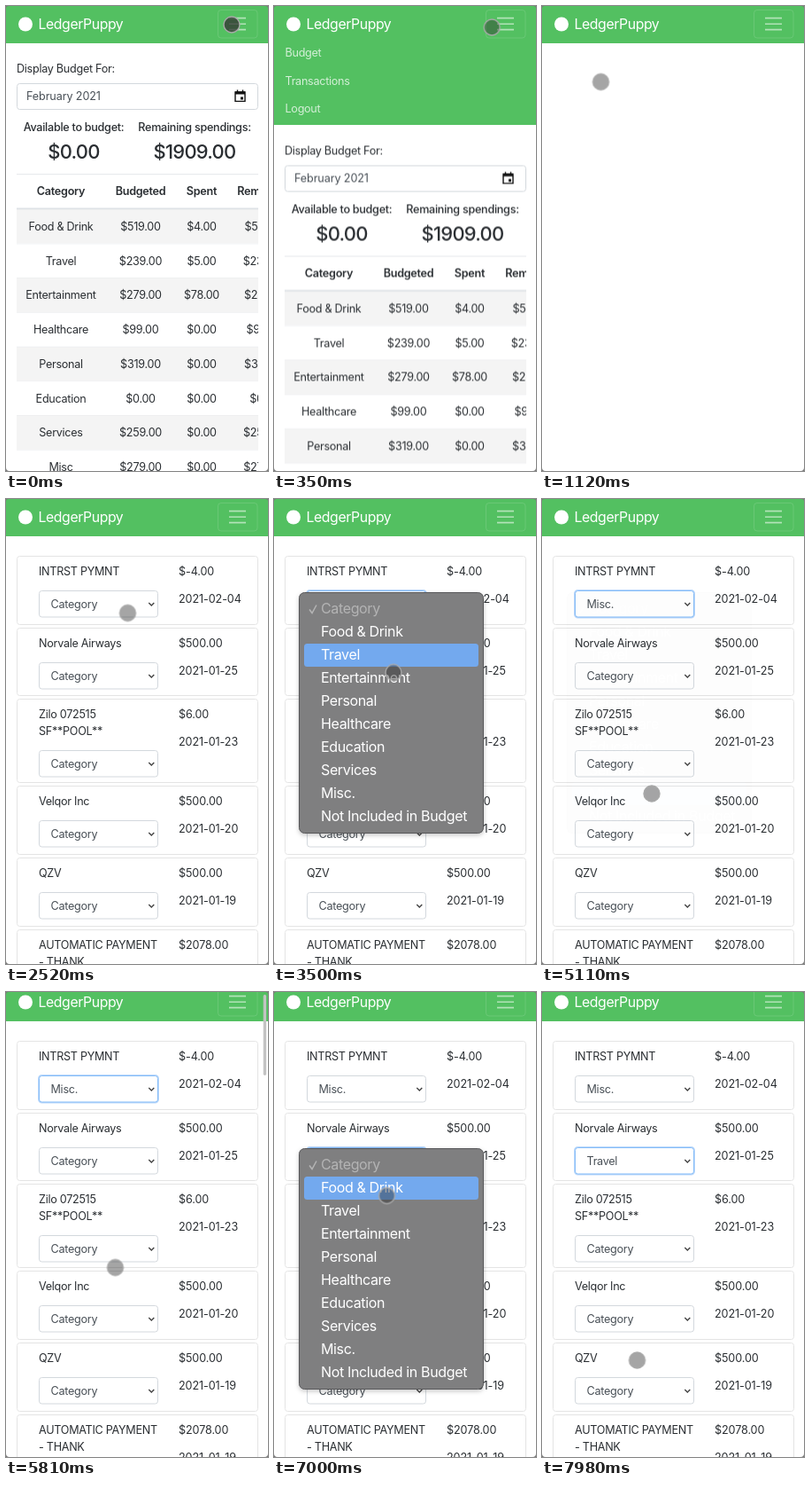
Write an HTML page that moves like this. It is 296 px wide and 524 px high and loops after 8 s.

```html
<!DOCTYPE html>
<html lang="en">
<head>
<meta charset="utf-8">
<title>Budget app demo</title>
<style>
html, body { margin: 0; width: 100%; height: 100%; overflow: hidden; background: #fff; }
svg { display: block; width: 296px; height: 524px; }
text { font: 12.63px Inter, "Liberation Sans", sans-serif; letter-spacing: -.29px; fill: #2a2e32; white-space: pre; }
.mid { text-anchor: middle; }
.medium { font-weight: 500; }
.bold { font-weight: 600; }
.big { font-size: 22px; font-weight: 500; letter-spacing: -.8px; }
.brand { font-size: 15.8px; letter-spacing: -.4px; fill: #fff; }
.link { fill: rgba(255,255,255,.75); }
.field { fill: #495057; }
.date { letter-spacing: -.12px; }
.item { font-size: 16px; letter-spacing: -.36px; fill: #fff; }
.off { fill: #b4b4b4; }
.box { fill: #fff; stroke: #d3d8dd; }
.card { fill: #fff; stroke: #e4e4e4; }
.glow { fill: none; stroke: #bcd9fb; stroke-width: 3; }
.ring { fill: #fff; stroke: #85bcf8; }
.arrow { fill: none; stroke: #444; stroke-width: 1.4; }

/* One loop is 8 s, so 1% is 80 ms. */
.anim { animation: 8s infinite; }
.step { animation-timing-function: step-end; }
#app { animation-name: scroll; }
#budget { animation-name: menu; animation-timing-function: ease; }
#menu { animation-name: first; }
#cards { animation-name: cards; }
#focus0 { animation-name: focus0; }
#focus1 { animation-name: focus1; }
#old0 { animation-name: old0; }
#new0 { animation-name: new0; }
#old1 { animation-name: old1; }
#new1 { animation-name: new1; }
#popup { animation-name: popup; }
#place { animation-name: place; }
#hover { animation-name: hover; }
#bar { animation-name: bar; }
#cursor { animation-name: move; animation-timing-function: ease-in-out; }
#dot { animation-name: press; fill: rgba(40,40,40,.42); stroke: #a8a8a8; stroke-width: 1.4; }

@keyframes scroll {
  0%, 66% { transform: none; }
  70.8%, 100% { transform: translateY(-9px); }
}
@keyframes menu {
  0%, .9% { transform: none; opacity: 1; }
  5.3%, 13% { transform: translateY(95px); opacity: 1; }
  13.01%, 100% { transform: translateY(95px); opacity: 0; }
}
@keyframes first { 0% { opacity: 1; } 13%, 100% { opacity: 0; } }
@keyframes cards { 0% { opacity: 0; } 25.3%, 100% { opacity: 1; } }
@keyframes focus0 { 0% { opacity: 0; } 32.6% { opacity: 1; } 81.2%, 100% { opacity: 0; } }
@keyframes focus1 { 0% { opacity: 0; } 81.2%, 100% { opacity: 1; } }
@keyframes old0 { 0% { opacity: 1; } 62.3%, 100% { opacity: 0; } }
@keyframes new0 { 0% { opacity: 0; } 62.3%, 100% { opacity: 1; } }
@keyframes old1 { 0% { opacity: 1; } 94.8%, 100% { opacity: 0; } }
@keyframes new1 { 0% { opacity: 0; } 94.8%, 100% { opacity: 1; } }
@keyframes popup {
  0%, 33.2% { opacity: 0; }
  33.21%, 62.3% { opacity: 1; }
  64.2%, 82% { opacity: 0; }
  82.01%, 94.8% { opacity: 1; }
  96.6%, 100% { opacity: 0; }
}
@keyframes place { 0% { transform: none; } 72%, 100% { transform: translateY(71px); } }
@keyframes hover {
  0% { opacity: 0; transform: none; }
  36.2% { opacity: 1; transform: none; }
  37.5% { opacity: 1; transform: translateY(26px); }
  45% { opacity: 1; transform: translateY(52px); }
  47% { opacity: 1; transform: translateY(78px); }
  48.9% { opacity: 1; transform: translateY(104px); }
  50.5% { opacity: 1; transform: translateY(130px); }
  52.5% { opacity: 1; transform: translateY(156px); }
  56% { opacity: 1; transform: translateY(182px); }
  72% { opacity: 0; transform: none; }
  85.6% { opacity: 1; transform: none; }
  89.3%, 100% { opacity: 1; transform: translateY(26px); }
}
@keyframes bar {
  0%, 65.9% { opacity: 0; }
  66.2%, 74.3% { opacity: 1; }
  78%, 100% { opacity: 0; }
}
@keyframes move {
  0%, 3.2% { transform: translate(255px, 21px); }
  11%, 15.5% { transform: translate(66.5px, 85.5px); }
  21.9%, 28.6% { transform: translate(130px, 180px); }
  31.3%, 34.6% { transform: translate(137.5px, 128.5px); }
  38.5%, 42% { transform: translate(135px, 190px); }
  54.25% { transform: translate(133.5px, 320.5px); }
  59%, 65.4% { transform: translate(124px, 332px); }
  70.8%, 74% { transform: translate(123.5px, 310.5px); }
  80.6%, 84% { transform: translate(125px, 196px); }
  87.5% { transform: translate(127.5px, 229.5px); }
  91%, 95% { transform: translate(126px, 251px); }
  99.3%, 100% { transform: translate(107.5px, 415px); }
}
@keyframes press {
  0% { fill: rgba(50,50,50,.75); }
  1.7% { fill: rgba(40,40,40,.42); }
  11.6% { fill: rgba(50,50,50,.75); }
  12.9% { fill: rgba(40,40,40,.42); }
  32.2% { fill: rgba(50,50,50,.75); }
  33.4% { fill: rgba(40,40,40,.42); }
  60.8% { fill: rgba(50,50,50,.75); }
  62% { fill: rgba(40,40,40,.42); }
  80.8% { fill: rgba(50,50,50,.75); }
  82% { fill: rgba(40,40,40,.42); }
  93.4% { fill: rgba(50,50,50,.75); }
  94.6%, 100% { fill: rgba(40,40,40,.42); }
}
</style>
</head>
<body>
<svg viewBox="0 0 296 524">
  <defs>
    <clipPath id="table"><rect x="12" y="180" width="273" height="400"/></clipPath>
    <filter id="shade" x="-10%" y="-10%" width="120%" height="120%">
      <feDropShadow dx="0" dy="2" stdDeviation="2.5" flood-opacity=".22"/>
    </filter>
  </defs>
  <rect width="296" height="524" fill="#fff"/>

  <g id="app" class="anim">
    <g id="menu" class="anim step"></g>
    <g id="budget" class="anim"></g>
    <g id="cards" class="anim step"></g>
    <g>
      <rect width="296" height="42" fill="#53c061"/>
      <circle cx="22" cy="20.5" r="8" fill="#fff"/>
      <text class="brand" x="36.5" y="25.7">LedgerPuppy</text>
      <rect x="239.5" y="4.5" width="44.5" height="31.5" rx="3.5" fill="none" stroke="#fff" stroke-opacity=".13"/>
      <path d="M252 13.6h19M252 20.2h19M252 26.6h19" stroke="#fff" stroke-opacity=".55" stroke-width="1.6"/>
    </g>
  </g>

  <g id="place" class="anim step"><g id="popup" class="anim">
    <rect x="28.5" y="105.5" width="208" height="271" rx="6" fill="#7f7f80" stroke="#58585a" filter="url(#shade)"/>
    <rect id="hover" class="anim step" x="34" y="137" width="197" height="26" rx="3.5" fill="#73a9ee"/>
    <path d="M40 124.5l3 4 5-9" fill="none" stroke="#b4b4b4" stroke-width="1.5"/>
    <g id="items"></g>
  </g></g>

  <rect id="bar" class="anim" x="290.7" y="3" width="3.4" height="91" rx="1.7" fill="#c3c3c3"/>
  <g id="cursor" class="anim"><circle id="dot" class="anim step" r="9"/></g>
  <path d="M0 520v4h4q-4 0-4-4M296 520v4h-4q4 0 4-4M0 3v-3h3q-3 0-3 3M296 3v-3h-3q3 0 3 3" fill="#777"/>
</svg>

<script>
const byId = id => document.getElementById(id);
const text = (x, y, s, cls = '', id = '') =>
  `<text x="${x}" y="${y}" class="${cls}"${id && ` id="${id}"`}>${s.replace('&', '&amp;')}</text>`;
const rect = (x, y, w, h, attrs) => `<rect x="${x}" y="${y}" width="${w}" height="${h}" ${attrs}/>`;
const money = n => '$' + n.toFixed(2);

byId('menu').innerHTML = rect(0, 0, 296, 138, 'fill="#53c061"') +
  ['Budget', 'Transactions', 'Logout'].map((s, i) => text(12.5, 57 + 31.6 * i, s, 'link')).join('');

// Budget page: name, budgeted, spent
const rows = [
  ['Food & Drink', 519, 4], ['Travel', 239, 5], ['Entertainment', 279, 78], ['Healthcare', 99, 0],
  ['Personal', 319, 0], ['Education', 0, 0], ['Services', 259, 0], ['Misc', 279, 0]
];
const columns = [62, 152, 221, 292];
const tableLine = (cells, y, cls) => cells.map((s, i) => text(columns[i], y, s, 'mid ' + cls)).join('');
const tableRow = ([name, plan, spent], i) => {
  const y = 229 + 38.7 * i;
  return rect(12, y, 273, 38.7, `fill="${i % 2 ? '#fff' : '#f4f4f4'}"`) +
    rect(12, y, 273, .6, 'fill="#e9ebed"') +
    tableLine([name, money(plan), money(spent), money(plan - spent)], y + 24, '');
};

byId('budget').innerHTML = rect(0, 42, 296, 530, 'fill="#fff"') +
  text(12, 75, 'Display Budget For:') +
  rect(12.5, 87.5, 272, 29, 'rx="3" class="box"') +
  text(23, 106.3, 'February 2021', 'field date') +
  '<path d="M259 97h11v10.4h-11zM261.5 94.5v3M267.5 94.5v3" fill="none" stroke="#111" stroke-width="1.4"/>' +
  '<path d="M259 96.5h11v3h-11zM265 102.5h3v3h-3z" fill="#111"/>' +
  text(76.5, 141, 'Available to budget:', 'mid medium') + text(76.5, 172, '$0.00', 'mid big') +
  text(213, 141, 'Remaining spendings:', 'mid medium') + text(213, 172, '$1909.00', 'mid big') +
  '<g clip-path="url(#table)">' +
  rect(12, 189.3, 273, .8, 'fill="#dee2e6"') +
  tableLine(['Category', 'Budgeted', 'Spent', 'Remaining'], 213.3, 'bold') +
  rect(12, 227.5, 273, 1.5, 'fill="#dee2e6"') +
  rows.map(tableRow).join('') + '</g>';

// Transactions: top, height, price, date, description lines
const cards = [
  [64.5, 77, '$-4.00', '2021-02-04', 'INTRST PYMNT'],
  [145.5, 76, '$500.00', '2021-01-25', 'Norvale Airways'],
  [225.5, 94, '$6.00', '2021-01-23', 'Zilo 072515', 'SF**POOL**'],
  [323.5, 77, '$500.00', '2021-01-20', 'Velqor Inc'],
  [404.5, 77, '$500.00', '2021-01-19', 'QZV'],
  [485.5, 115, '$2078.00', '2021-01-19', 'AUTOMATIC PAYMENT', '- THANK']
];
const picks = ['Misc.', 'Travel'];

function select(y, i) {
  const frame = cls => rect(37.5, y, 134, 29.5, `rx="3" class="${cls}"`);
  const label = (s, id, cls = 'field') => text(50.5, y + 19.6, s, cls, id);
  const values = picks[i]
    ? `<g id="focus${i}" class="anim step">${frame('glow')}${frame('ring')}</g>` +
      label('Category', 'old' + i, 'field anim step') + label(picks[i], 'new' + i, 'field anim step')
    : label('Category');
  return frame('box') + values + `<path class="arrow" d="M161.3 ${y + 13.6}l3 3 3-3"/>`;
}

byId('cards').innerHTML = cards.map(([y, h, price, date, ...lines], i) =>
  rect(12.5, y, 272, h, 'rx="3" class="card"') +
  lines.map((s, n) => text(37, y + 21.3 + 19 * n, s)).join('') +
  text(195, y + 21.3, price, 'date') + text(195, y + 52.4, date, 'date') +
  (i < 5 ? select(y + 39 + 19 * (lines.length - 1), i) : '')
).join('');

byId('items').innerHTML = ['Category', 'Food & Drink', 'Travel', 'Entertainment', 'Personal', 'Healthcare',
  'Education', 'Services', 'Misc.', 'Not Included in Budget']
  .map((s, i) => text(53, 129 + 26 * i, s, i ? 'item' : 'item off')).join('');
</script>
</body>
</html>
```
